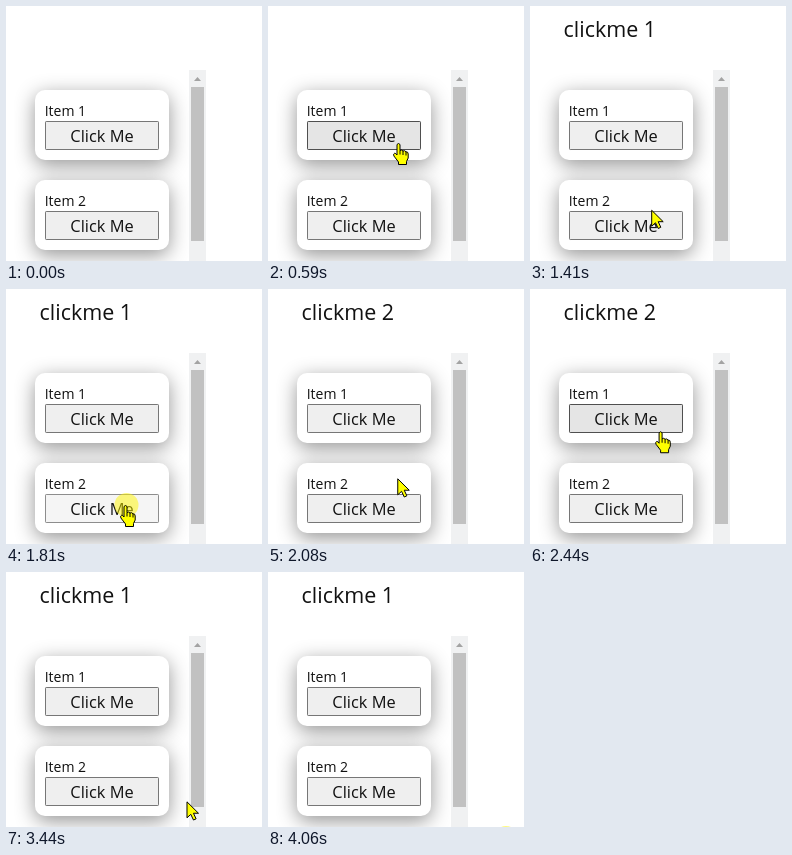
An HTML page that plays this animation: 256 px wide and 255 px high, repeating every 4120 ms.

```html
<!DOCTYPE html>
<html lang="en">
<head>
<meta charset="utf-8">
<title>Click Me list</title>
<style>
  html, body { margin: 0; width: 100%; height: 100%; overflow: hidden; background: #fff; }
  svg { display: block; width: 100%; height: 100%; }
  text { font-family: "Open Sans", "Noto Sans", sans-serif; fill: #111; }
  .card { fill: #fff; filter: drop-shadow(0 5px 10px rgba(0, 0, 0, .42)); }
  .cursor { fill: #ff0; stroke: #000; stroke-linejoin: round; }
</style>
</head>
<body>
<svg viewBox="0 0 256 255">
  <defs>
    <clipPath id="view"><rect x="8" y="64" width="175" height="191"/></clipPath>
  </defs>
  <text id="message" x="33.6" y="31" font-size="21.5"></text>
  <g id="list" clip-path="url(#view)"></g>
  <rect x="183" y="64" width="17" height="191" fill="#f0f1f2"/>
  <path d="M188 75L191.5 71L195 75Z" fill="#a3a3a3"/>
  <rect x="185" y="81" width="13" height="154" fill="#c1c1c1"/>
  <circle id="halo" r="12" fill="#fff500" fill-opacity=".5"/>
  <path id="arrow" class="cursor" d="M.5 .5V16.5L4.3 13L7 18.7L9.6 17.5L7 11.9H12Z"/>
  <g id="hand" class="cursor">
    <path d="M-1.5 1.5Q0 -.5 1.5 1.5V7.5Q3.2 6.4 4.5 8Q6.2 7 7.5 8.8Q9.7 8.6 9.7 11V15L8 18.5V21.5H0V19L-4.6 13Q-5.6 10.8 -3.8 10.2Q-2.8 10 -1.5 12Z"/>
    <path d="M1.5 7.5V11.5M4.5 8V12M7.5 8.8V12.5" fill="none"/>
  </g>
</svg>
<script>
const LOOP = 4120, PRESS = 130, STEP = 68;
const $ = id => document.getElementById(id);

// Each trip starts when the previous press ends, slows down, then clicks.
const home = { x: 199, y: 215, click: 0 };
const trips = [
  { x: 130.5, y: 137, end: 590, click: 730, power: 1.6, bow: 0, item: 1 },
  { x: 119.5, y: 216, end: 1680, click: 1810, power: 1.7, bow: 0, item: 2 },
  { x: 127.5, y: 128, end: 2720, click: 2990, power: 1.8, bow: 9, item: 1 },
  { x: 237, y: 266, end: 4060, click: 4060, power: 3, bow: -37 }
];
const looks = {
  idle: ["#efefef", "#767676"],
  hover: ["#e5e5e5", "#4f4f4f"],
  active: ["#f5f5f5", "#8d8d8d"]
};

const cards = [0, 90].map((dy, i) => {
  $("list").insertAdjacentHTML("beforeend", `
    <g transform="translate(0 ${dy})">
      <rect class="card" x="29" y="84" width="134" height="70" rx="10"/>
      <text x="38.7" y="109.5" font-size="14">Item ${i + 1}</text>
      <rect id="button${i}" x="39.5" y="115.5" width="113" height="28" rx=".7"/>
      <text x="96" y="136" font-size="16.4" text-anchor="middle">Click Me</text>
    </g>`);
  return { button: $("button" + i), top: 115 + dy };
});

function pointer(t) {
  const i = trips.findLastIndex((_, n) => t >= (trips[n - 1] || home).click + PRESS);
  if (i < 0) return { ...home, last: home, trip: home };
  const trip = trips[i], last = trips[i - 1] || home;
  const start = last.click + PRESS, span = trip.end - start;
  const steps = Math.round(span / STEP);
  const p = Math.min(1, Math.floor((t - start) / span * steps + 0.25) / steps);
  const e = 1 - (1 - p) ** trip.power;
  return {
    x: last.x + (trip.x - last.x) * e + trip.bow * Math.sin(Math.PI * e),
    y: last.y + (trip.y - last.y) * e,
    last, trip
  };
}

function place(el, x, y, visible) {
  el.setAttribute("transform", `translate(${x} ${y})`);
  el.style.display = visible ? "" : "none";
}

function draw(t) {
  const { x, y, last, trip } = pointer(t);
  const shown = trip !== home;
  const pressed = shown && t >= trip.click;
  let over = false;

  for (const { button, top } of cards) {
    const inside = shown && x >= 39 && x <= 153 && y >= top && y < top + 29;
    const [fill, stroke] = looks[inside ? (pressed ? "active" : "hover") : "idle"];
    button.setAttribute("fill", fill);
    button.setAttribute("stroke", stroke);
    over = over || inside;
  }

  $("message").textContent = last.item ? "clickme " + last.item : "";
  place($("halo"), x + 1, y, pressed);
  place($("arrow"), x, y, shown && !over);
  place($("hand"), x, y, over);
}

const begin = performance.now();
function tick() {
  draw((performance.now() - begin) % LOOP);
  requestAnimationFrame(tick);
}
tick();
</script>
</body>
</html>
```
